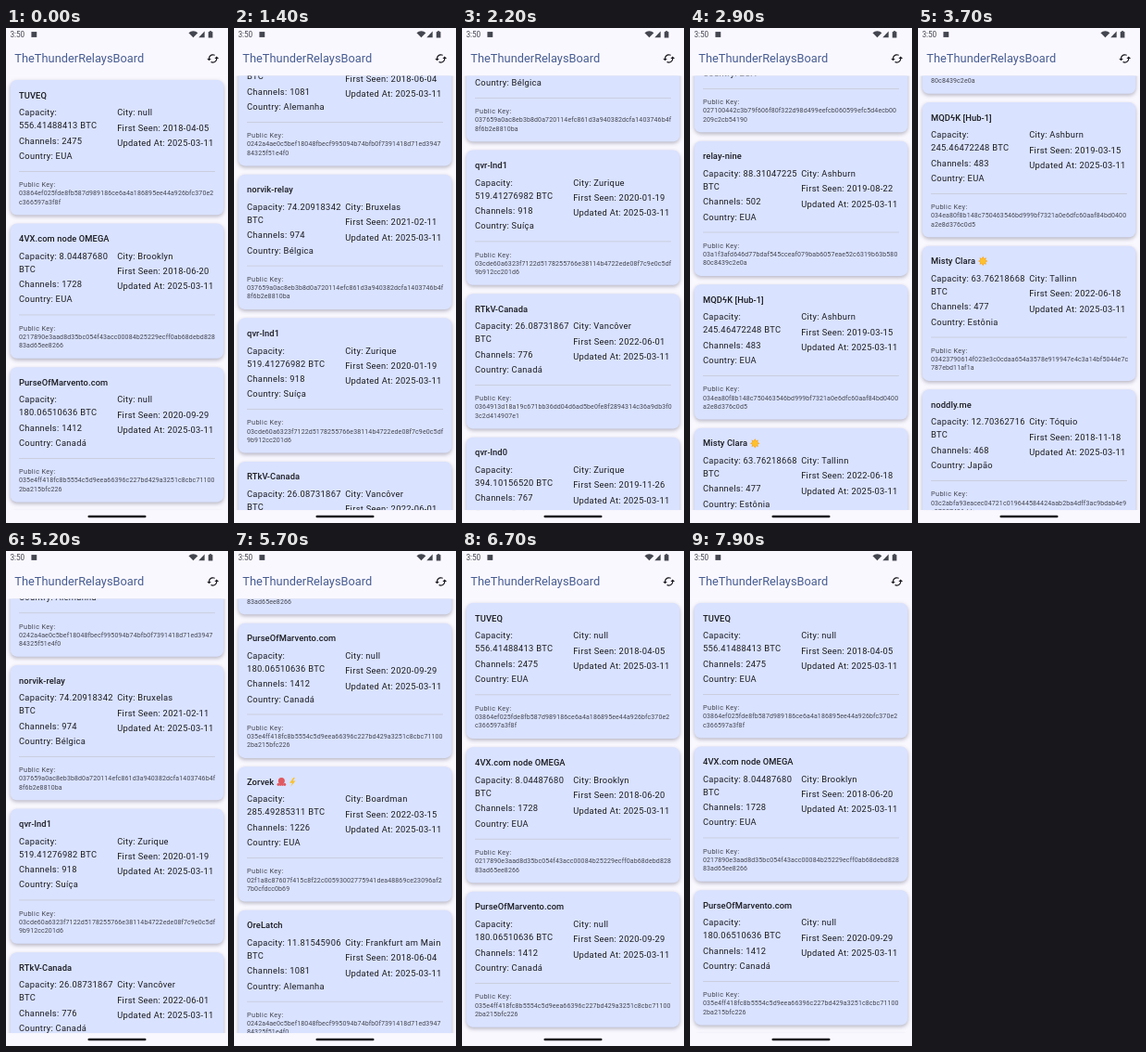
These frames come from a looping animation (240x533 px, 8000 ms). An HTML page with a canvas:

```html
<!DOCTYPE html>
<html lang="pt">
<head>
<meta charset="utf-8">
<title>Node ranking</title>
<style>
  html, body { margin: 0; width: 100%; height: 100%; overflow: hidden; background: #faf8ff; }
  canvas { display: block; width: 240px; height: 533px; }
</style>
</head>
<body>
<canvas id="stage"></canvas>
<script>
const LOOP = 8000, TICK = 100;
const W = 240, H = 533, DP = 7 / 12;          // stage pixels per dp
const LIST_TOP = 88, LIST_END = 890;          // dp
const PITCH = 265, CARD_H = 249, CARD_W = 395.4;
const INK = '#1a1b20', SOFT = '#44464f', PAPER = '#faf8ff', CARD = '#d9e2ff', LINE = '#c5c6d0', BRAND = '#475d92';

const canvas = document.getElementById('stage');
const ctx = canvas.getContext('2d');
const dpr = window.devicePixelRatio || 1;
canvas.width = W * dpr;
canvas.height = H * dpr;

// name, capacity, channels, country, city, first seen, key lines
const nodes = [
  ['TUVEQ', '556.41488413', 2475, 'EUA', 'null', '2018-04-05',
    '03864ef025fde8fb587d989186ce6a4a186895ee44a926bfc370e2 c366597a3f8f'],
  ['4VX.com node OMEGA', '8.04487680', 1728, 'EUA', 'Brooklyn', '2018-06-20',
    '0217890e3aad8d35bc054f43acc00084b25229ecff0ab68debd828 83ad65ee8266'],
  ['PurseOfMarvento.com', '180.06510636', 1412, 'Canadá', 'null', '2020-09-29',
    '035e4ff418fc8b5554c5d9eea66396c227bd429a3251c8cbc71100 2ba215bfc226'],
  ['Zorvek', '285.49285311', 1226, 'EUA', 'Boardman', '2022-03-15',
    '02f1a8c87607f415c8f22c00593002775941dea48869ce23096af2 7b0cfdcc0b69', drawCreature],
  ['OreLatch', '11.81545906', 1081, 'Alemanha', 'Frankfurt am Main', '2018-06-04',
    '0242a4ae0c5bef18048fbecf995094b74bfb0f7391418d71ed3947 84325f51e4f0'],
  ['norvik-relay', '74.20918342', 974, 'Bélgica', 'Bruxelas', '2021-02-11',
    '037659a0ac8eb3b8d0a720114efc861d3a940382dcfa1403746b4f 8f6b2e8810ba'],
  ['qvr-lnd1', '519.41276982', 918, 'Suíça', 'Zurique', '2020-01-19',
    '03cde60a6323f7122d5178255766e38114b4722ede08f7c9e0c5df 9b912cc201d6'],
  ['RTkV-Canada', '26.08731867', 776, 'Canadá', 'Vancôver', '2022-06-01',
    '0364913d18a19c671bb36dd04d6ad5be0fe8f2894314c36a9db3f0 3c2d414907e1'],
  ['qvr-lnd0', '394.10156520', 767, 'Suíça', 'Zurique', '2019-11-26',
    '033d8656219478701227199cbd6f670335c8d408a92ae88b962c4 9d4dc0e83e025'],
  ['Drovz', '54.53167463', 693, 'Espanha', 'Madrid', '2019-02-08',
    '026165850492521f4ac8abd9bd8088123446d126f648ca35e60f88 177dc149ceb2'],
  ['plako_1', '5.48136709', 666, 'EUA', 'Ashburn', '2020-07-01',
    '023d70f2f76d283c6c4e58109ee3a2816eb9d8feb40b23d6246906 0a2b2867b77f'],
  ['v=', '397.79165934', 571, 'EUA', 'Ashburn', '2023-03-03',
    '027100442c3b79f606f80f322d98d499eefcb060599efc5d4ecb00 209c2cb54190'],
  ['relay-nine', '88.31047225', 502, 'EUA', 'Ashburn', '2019-08-22',
    '03a1f3afd646d77bdaf545cceaf079bab6057eae52c6319b63b580 80c8439c2e0a'],
  ['MQDϟK [Hub-1]', '245.46472248', 483, 'EUA', 'Ashburn', '2019-03-15',
    '034ea80f8b148c750463546bd999bf7321a0e6dfc60aaf84bd0400 a2e8d376c0d5'],
  ['Misty Clara', '63.76218668', 477, 'Estônia', 'Tallinn', '2022-06-18',
    '03423790614f023e3c0cdaa654a3578e919947e4c3a14bf5044e7c 787ebd11af1a', drawSun],
  ['noddly.me', '12.70362716', 468, 'Japão', 'Tóquio', '2018-11-18',
    '03c2abfa93eacec04721c019644584424aab2ba4dff3ac9bdab4e9 c97007491dda'],
];

// Flings: start ms, end ms, scroll from, scroll to, decay power
const flings = [
  [50, 1150, 0, 720, 2.4],
  [1050, 2200, 720, 1460.5, 2.4],
  [2200, 3550, 1460.5, 3403.7, 2.4],
  [3950, 4700, 3403.7, 2209.5, 2],
  [4700, 6500, 2209.5, 0, 1.85],
];

function scrollAt(t) {
  let y = 0;
  for (const [t0, t1, from, to, power] of flings) {
    if (t < t0) break;
    const u = Math.min(1, (t - t0) / (t1 - t0));
    const start = t0 < 1100 && t0 > 1000 ? Math.max(y, from - 1) : from;
    y = start + (to - start) * (1 - Math.pow(1 - u, power));
  }
  return y;
}

// Overscroll stretch after the list hits its top
function stretchAt(t) {
  return t >= 6600 && t < 7000 ? 1 + 0.012 * Math.exp((6600 - t) / 110) : 1;
}

// Text placed by the vertical centre of its line box
function text(str, x, mid, size, { color = INK, weight = 400, gap = 0 } = {}) {
  ctx.font = `${weight} ${size}px Roboto, "Noto Sans", "DejaVu Sans", sans-serif`;
  ctx.letterSpacing = gap + 'px';
  ctx.fillStyle = color;
  ctx.fillText(str, x, mid + size * 0.342);
  return ctx.measureText(str).width;
}

function shape(color, points) {
  ctx.fillStyle = color;
  ctx.beginPath();
  points.forEach(([x, y]) => ctx.lineTo(x, y));
  ctx.fill();
}

function disc(color, x, y, r) {
  ctx.fillStyle = color;
  ctx.beginPath();
  ctx.arc(x, y, r, 0, Math.PI * 2);
  ctx.fill();
}

function drawSun(x, y) {
  const rays = [];
  for (let i = 0; i < 16; i++) {
    const r = i % 2 ? 5.5 : 9, a = i * Math.PI / 8;
    rays.push([x + 9 + r * Math.cos(a), y + r * Math.sin(a)]);
  }
  shape('#f9a825', rays);
  disc('#fdc02f', x + 9, y, 5.2);
}

function drawCreature(x, y) {
  disc('#e0595f', x + 9, y - 2, 6);
  for (let i = 0; i < 4; i++) disc('#e0595f', x + 3 + i * 4, y + 5, 2.4);
  shape('#fbc02d', [[31, -8], [24, 2], [29, 2], [26, 9], [35, -2], [30, -2], [34, -8]]
    .map(([px, py]) => [x + px, y + py]));
}

function drawCard([name, cap, channels, country, city, seen, key, badge], top) {
  const left = 24, right = 206;
  const body = { gap: 0.5 };

  ctx.save();
  ctx.shadowColor = 'rgba(20, 24, 50, .3)';
  ctx.shadowBlur = 4.5 * dpr;
  ctx.shadowOffsetY = 1.8 * dpr;
  ctx.fillStyle = CARD;
  ctx.beginPath();
  ctx.roundRect(8, top, CARD_W, CARD_H, 12);
  ctx.fill();
  ctx.restore();

  const width = text(name, left, top + 28, 16, { weight: 500, gap: 0.15 });
  if (badge) badge(left + width + 5, top + 28);

  const wide = cap.indexOf('.') > 2;
  const rows = wide ? ['Capacity:', cap + ' BTC'] : ['Capacity: ' + cap, 'BTC'];
  text(rows[0], left, top + 60, 16, body);
  text(rows[1], left, top + 84, 16, body);
  text('Channels: ' + channels, left, top + 112, 16, body);
  text('Country: ' + country, left, top + 140, 16, body);

  text('City: ' + city, right, top + 60, 16, body);
  text('First Seen: ' + seen, right, top + 88, 16, body);
  text('Updated At: 2025-03-11', right, top + 116, 16, body);

  ctx.fillStyle = LINE;
  ctx.fillRect(left, top + 168, CARD_W - 32, 1.2);
  text('Public Key:', left, top + 193, 12.6, { color: SOFT, gap: 0.6 });
  key.split(' ').forEach((line, i) =>
    text(line, left, top + 209 + i * 16, 12, { color: SOFT, gap: 0.2 }));
}

const syncIcon = new Path2D('M19 8l-4 4h3c0 3.31-2.69 6-6 6-1.01 0-1.97-.25-2.8-.7l-1.46 1.46C8.97 19.54 10.43 20 12 20c4.42 0 8-3.58 8-8h3l-4-4zM6 12c0-3.31 2.69-6 6-6 1.01 0 1.97.25 2.8.7l1.46-1.46C15.03 4.46 13.57 4 12 4c-4.42 0-8 3.58-8 8H1l4 4 4-4H6z');

function drawBars() {
  ctx.fillStyle = PAPER;
  ctx.fillRect(0, 0, 412, LIST_TOP);
  ctx.fillRect(0, LIST_END, 412, 30);

  text('3:50', 7.5, 12, 14, { color: SOFT });
  ctx.fillStyle = SOFT;
  ctx.fillRect(47, 7, 10, 10);

  // wifi, signal, battery
  ctx.beginPath();
  ctx.moveTo(347, 17.5);
  ctx.arc(347, 17.5, 12, -Math.PI * 0.75, -Math.PI * 0.25);
  ctx.fill();
  shape(SOFT, [[357, 17.5], [368, 17.5], [368, 6]]);
  ctx.fillRect(375, 7, 8, 11);
  ctx.fillRect(377, 5.5, 4, 2);

  text('TheThunderRelaysBoard', 16, 56, 22, { color: BRAND });
  ctx.save();
  ctx.translate(371.4, 44.5);
  ctx.fillStyle = INK;
  ctx.fill(syncIcon);
  ctx.restore();

  ctx.fillStyle = INK;
  ctx.beginPath();
  ctx.roundRect(151.7, 899.7, 108, 4, 2);
  ctx.fill();
}

function draw(t) {
  const scale = DP * dpr;
  ctx.setTransform(scale, 0, 0, scale, 0, 0);
  ctx.fillStyle = PAPER;
  ctx.fillRect(0, 0, 412, 915);

  const scroll = scrollAt(t);
  ctx.save();
  ctx.beginPath();
  ctx.rect(0, LIST_TOP, 412, LIST_END - LIST_TOP);
  ctx.clip();
  ctx.translate(0, LIST_TOP);
  ctx.scale(1, stretchAt(t));
  ctx.translate(0, -LIST_TOP);
  nodes.forEach((node, i) => {
    const top = LIST_TOP + 8 + i * PITCH - scroll;
    if (top > -CARD_H && top < LIST_END + 10) drawCard(node, top);
  });
  ctx.restore();
  drawBars();
}

function frame() {
  const t = performance.now() % LOOP;
  draw(Math.floor(t / TICK) * TICK);
  requestAnimationFrame(frame);
}
frame();
</script>
</body>
</html>
```
